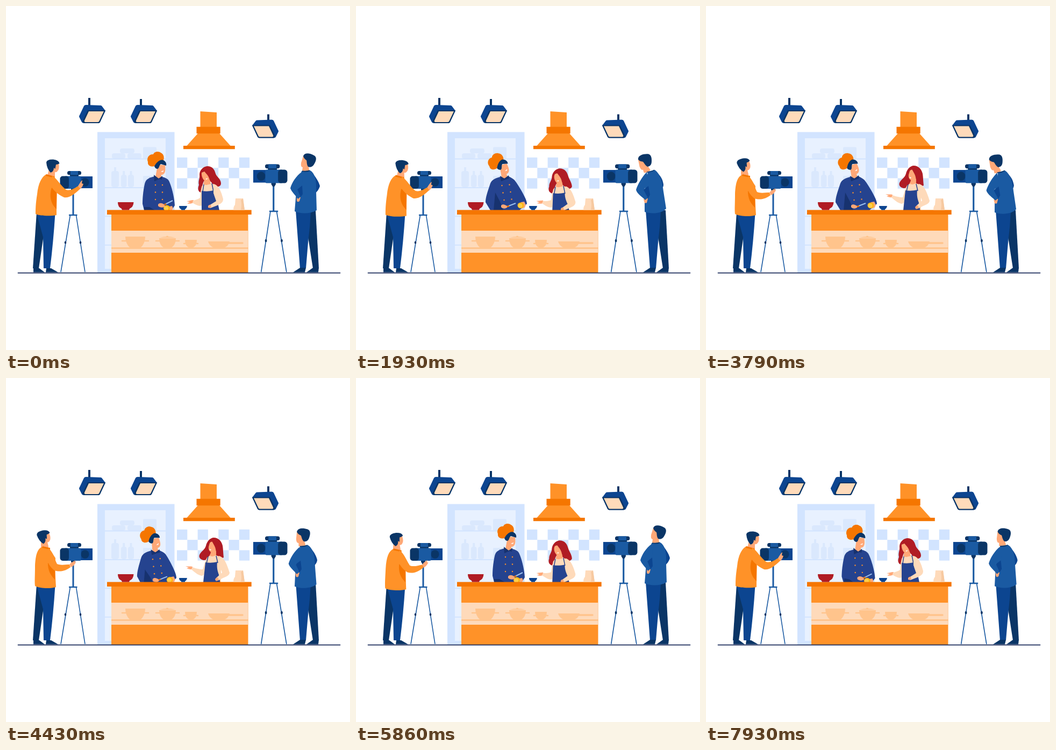
An HTML page with a canvas that plays this animation: 640x640 px, repeating every 8 s.

```html
<!DOCTYPE html>
<html>
<head>
<meta charset="utf-8">
<title>Cooking show</title>
<style>
html, body { margin: 0; height: 100%; overflow: hidden; background: #fff; }
canvas { display: block; width: 100vw; height: 100vh; }
</style>
</head>
<body>
<canvas id="stage" width="640" height="640"></canvas>
<script>
const ctx = document.getElementById('stage').getContext('2d');
const NAVY = '#0a3566', BLUE = '#0c4590', MID = '#1a5aa2', ROYAL = '#25438f', INK = '#17326f',
  ORANGE = '#ff9228', DEEP = '#f57600', CREAM = '#fedaba', SAND = '#ffc48c', SKIN = '#ffa877',
  RED = '#b01c24', ICE = '#d2e4ff', FROST = '#e8f1ff', MIST = '#dae8fd';

const fill = (d, color) => { ctx.fillStyle = color; ctx.fill(new Path2D(d)); };
const line = (d, color, width, cap = 'butt') => {
  ctx.strokeStyle = color; ctx.lineWidth = width; ctx.lineCap = cap; ctx.stroke(new Path2D(d));
};
const rect = (x1, y1, x2, y2, color, r = 0) => {
  ctx.fillStyle = color; ctx.beginPath(); ctx.roundRect(x1, y1, x2 - x1, y2 - y1, r); ctx.fill();
};
const oval = (x, y, rx, ry, color) => {
  ctx.fillStyle = color; ctx.beginPath(); ctx.ellipse(x, y, rx, ry, 0, 0, 7); ctx.fill();
};
const within = (draw, ...matrix) => { ctx.save(); ctx.transform(...matrix); draw(); ctx.restore(); };

const lerp = (a, b, k) => a + (b - a) * k;
// Blend two paths that share the same commands
const mix = (a, b, k) => {
  const ends = b.match(/[\d.]+/g);
  let i = 0;
  return a.replace(/[\d.]+/g, n => lerp(+n, +ends[i++], k));
};
const ease = p => {
  p = Math.min(1, Math.max(0, p));
  return p < .5 ? 2 * p * p : 1 - 2 * (1 - p) ** 2;
};
const sway = (t, go, back, span) => ease((t - go) / span) - ease((t - back) / span);

// Figure that dips while it goes from one pose to the other
function figure(k, dip, draw) {
  const morph = (a, b, color) => fill(mix(a, b, k), color);
  within(() => draw(morph), 1, 0, 0, 1, 0, dip * Math.sin(Math.PI * k));
}
function head(x, y, dx, dy, degrees, draw) {
  ctx.save();
  ctx.translate(x + dx, y + dy);
  ctx.rotate(degrees * Math.PI / 180);
  ctx.translate(-x, -y);
  draw();
  ctx.restore();
}

function lamp(poleTop) {
  rect(153, poleTop, 157, 186, NAVY);
  fill('M149 184L176 185Q178 185 179 187L185 195L175 216Q174 218 172 218L145 218Q142 218 141 216L136 206Q136 204 137 203L145 186Q146 184 149 184Z', BLUE);
  fill('M152 194L185 194L175 216Q174 218 172 218L145 218L142 215Z', NAVY);
  fill('M154 196L182 196L173 215Q172 216 170 216L147 216Q145 215 146 213Z', CREAM);
}

function backdrop() {
  rect(0, 0, 640, 640, '#fff');
  lamp(171);
  within(() => lamp(173), 1, 0, 0, 1, 96, 0);
  within(() => lamp(174), -1, 0, 0, 1, 643, 27.5);

  rect(170, 234.5, 313.5, 496, ICE);
  rect(184, 246, 297, 489, FROST);
  rect(197, 274, 222, 284, MIST, 4);
  rect(226, 274, 252, 284, MIST, 4);
  rect(212, 265, 239, 274, MIST, 4);
  rect(255, 262.5, 280, 284, MIST, 2);
  rect(255, 316, 280, 338, MIST, 2);
  for (const [x, w, y] of [[196, 14, 300], [214, 10.5, 307], [227, 11, 307]]) {
    rect(x, y + 7, x + w, 337, MIST, 4);
    rect(x + w / 2 - 2, y, x + w / 2 + 2, y + 10, MIST);
  }
  for (let y = 284.5; y < 450; y += 53.4) line(`M184 ${y}H297`, ICE, 2);

  const tile = 19.3;
  for (let i = 0; i < 21; i += 2) {
    const x = 318 + i % 7 * tile, y = 281.8 + Math.floor(i / 7) * tile;
    rect(x, y, x + tile, y + tile, ICE);
  }

  fill('M361.5 196L392 198V226H361.5Z', ORANGE);
  fill('M357 237H397L418.5 261H335.5Z', ORANGE);
  rect(354.5, 224.7, 398.7, 237.3, DEEP);
  rect(330, 260, 425.8, 266.3, DEEP);
}

function chef(k) {
  figure(k, 5.3, morph => {
    morph('M276 317C264 320 260 323 258 331C255 345 254 358 254 368L257 380L308 380L314 371C313 355 308 335 303 325C300 321 296 319 291 318Z',
      'M268 318C256 321 251 325 249 333C245 345 241 356 241 365L250 380L304 380L318 368C319 360 300 330 295 324C292 321 288 319 284 317Z', ROYAL);
    rect(250, 380, 310, 388, ROYAL);
    morph('M257 374L267 374L277 380L257 380Z', 'M259 347L268 364L274 380L256 380Z', INK);
    for (let i = 0; i < 6; i++) {
      const col = i % 2, row = i >> 1;
      oval(lerp(278 + 13 * col, 271.5 + 14 * col + 2 * row, k),
        lerp(333, 334 - 1.5 * col, k) + 13.5 * row, 1.2, 1.2, ORANGE);
    }
    head(284, 316, -8 * k, 0, -20 * k, () => {
      fill('M283 295L296 296C297 305 297 312 291 314L289 314L289 319L284 321L278 318L281 302Z', SKIN);
      fill('M276 298C270 300 263 297 264 290C261 283 266 275 274 276C276 270 285 270 288 273C293 275 295 281 293 287C288 287 280 291 276 298Z', DEEP);
      fill('M276 298C280 290 288 284 293 287C297 289 299 293 298 297L288 294C285 296 285 302 282 303C279 303 277 301 276 298Z', NAVY);
      fill('M288 308L293 306Q293 310 288 308Z', '#fff');
    });
    morph('M275 314L284 321L291 316L290 323L285 322L276 326Z', 'M268 316L276 321L284 315L285 321L278 323L270 326Z', INK);
    morph('M304 373L309 372L311 377L308 380L304 380Z', 'M307 365L313 364L316 370L314 375L308 377Z', SKIN);
    const x = lerp(299, 306.5, k), y = lerp(376, 371, k);
    oval(x, y, 6, 5.5, '#fcb813');
    oval(x - 1, y + .5, 4, 4, '#ffcd4a');
    line(mix('M297 368.5L310 362', 'M284 372L297 367', k), '#9dc0ee', 2);
    line(mix('M290 372L298 368', 'M277 374.5L285 372', k), DEEP, 2.5);
    morph('M283 369C286 366 289 366 294 369L296 373C291 376 286 375 283 372Z',
      'M270 371C273 368 276 369 281 372L281 375C277 378 272 377 270 374Z', SKIN);
  });
}

function cook(k) {
  figure(k, 5, morph => {
    morph('M374 298C385 298 388 305 390 312C392 318 400 322 400 330C400 336 394 337 389 336C384 334 384 329 380 326L368 326C364 334 366 340 362 347C356 344 357 338 359 333C357 325 361 321 360 314C360 306 366 299 374 298Z',
      'M386 297C396 297 401 304 403 312C404 318 404 326 405 334C401 336 396 335 393 333C390 332 390 330 388 328L380 328C377 334 374 339 368 339C362 338 358 334 360 329C362 323 370 320 372 312C374 304 379 298 386 297Z', RED);
    morph('M367 332L383 330L390 334L396 390L365 390L362 350L364 336Z', 'M378 331L391 330L400 333L400 390L366 390L369 352L372 338Z', CREAM);
    morph('M369 324L379 322L381 331L373 333L367 332Z', 'M382 321L391 321L391 330L384 332L379 331Z', SKIN);
    morph('M364 310C366 309 375 305 378 311C381 319 380 327 375 328C368 327 363 318 364 310Z',
      'M379 307C382 302 389 305 390 311C392 318 391 325 386 326C380 325 376 320 377 314Z', SKIN);
    morph('M367 302C369 312 376 311 379 324L386 322L382 304Z', 'M382 300C385 310 389 310 391 323L398 322L394 302Z', RED);
    morph('M371 322L375 320Q375 324 371 322Z', 'M378 318L382 319Q380 323 378 318Z', '#fff');
    morph('M349 361C344 361 340 363 336 363L342 365L337 367C342 369 345 367 349 366Z',
      'M347 351C343 350 339 351 334 350L340 353L336 354C341 356 343 356 346 356Z', SKIN);
    morph('M367 333C362 338 362 349 361 357C356 360 352 361 348 362L347 366C354 371 361 373 364 371C367 362 370 346 367 333Z',
      'M376 332C371 336 369 348 366 356C360 356 352 354 347 352L345 356C352 363 360 368 365 368C372 364 376 348 376 332Z', CREAM);
    morph('M364 344C372 345 378 345 386 343C386 352 390 358 394 366L399 390L364 390Z',
      'M371 343C378 344 385 344 393 342C392 352 393 358 396 366L400 390L366 390Z', ROYAL);
    line(mix('M368 332L366 345M383 330L386 345', 'M376 332L373 345M391 331L394 344', k), ROYAL, 1.5);
    morph('M386 331C396 333 401 347 404 359C404 366 399 368 393 371L380 376L378 371L391 363L386 348Z',
      'M396 331C407 333 412 350 416 362C416 368 408 370 404 372L394 377L391 372L402 362L397 348Z', CREAM);
    morph('M376 372Q378 369 381 370L382 374Q379 377 376 375Z', 'M389 374Q391 371 394 371L396 375Q392 379 390 377Z', SKIN);
  });
}

function pot(x, width, top, grip, gripY) {
  fill(`M${x} ${top}H${x + width}Q${x + width} ${top + 13} ${x + width - 9} 450H${x + 9}Q${x} ${top + 13} ${x} ${top}Z`, SAND);
  line(`M${x - grip} ${gripY}H${x + width + grip}`, SAND, 2.5, 'round');
}

function counter() {
  rect(196, 388, 450.5, 496, ORANGE);
  rect(196, 418, 450.5, 459, CREAM);
  rect(196, 449, 450.5, 452, SAND);
  pot(222, 37, 429, 6, 437);
  pot(285, 31, 432, 6, 437);
  fill('M286 431Q300 427 315 431Z', SAND);
  oval(300, 429, 2, 1.5, SAND);
  pot(333, 22, 435, 2, 442);
  fill('M376 438H416Q414 447 405 450H387Q378 446 376 438Z', SAND);
  line('M413 441H440', SAND, 3.5, 'round');
  rect(188, 379.5, 456.7, 388, DEEP);
  fill('M208 365H237.5Q237 374 230 377L229 379.5H216L215 377Q208 374 208 365Z', RED);
  fill('M322 372H337Q336 377 333 378V379.5H326V378Q322 377 322 372Z', BLUE);
  fill('M427 358H441L444 379.5H423Q423 373 426 370Z', CREAM);
  fill('M437 361L441 358L444 379.5H437Q439 370 437 361Z', '#f7c9a0');
}

function camera() {
  line('M119.5 389L102 495M130.5 389L147 495', MID, 1.6);
  line('M117 389H132.5', MID, 2.4);
  line('M125 344V389', MID, 3);
  oval(110.5, 440, 1.8, 2.6, NAVY);
  oval(138.5, 440, 1.8, 2.6, NAVY);
  fill('M121 339H129V342L126.5 346H123.5L121 342Z', NAVY);
  rect(138, 317, 161, 339, BLUE);
  oval(147, 328, 7.5, 8, NAVY);
  rect(119, 312, 135, 318, NAVY);
  rect(114, 307, 140, 314.3, NAVY, 3.5);
  rect(120, 307, 134, 314.3, MID);
  rect(109, 316.5, 139.5, 340, MID, 2);
  rect(100.5, 316.5, 117, 340, NAVY, 5);
}

function legs() {
  fill('M57 384L50 488H61L76 386Z', NAVY);
  fill('M57 386L69 430L70 488H82Q88 440 91.5 386Z', BLUE);
  fill('M51 486L62 488L72 495.5H51Z', NAVY);
  fill('M75 488H84L97 495.5H74Z', NAVY);
  fill('M560 380H576L582 488H571L562 430Z', NAVY);
  fill('M539 380L547 488H558L562 440Q566 410 567 380Z', BLUE);
  fill('M547 487H558L556 495.5H534Z', NAVY);
  fill('M571 487H582L581 495.5H559Z', NAVY);
  line('M22.5 496.6H621.5', '#1c2c5b', 1.8, 'round');
}

function operator(k) {
  figure(k, 5, morph => {
    head(84, 316, -12 * k, -2 * k, -14 * k, () => {
      fill('M88 293L98 293Q100 303 96 307Q94 310 91 309V318L84 321L77 315L80 304Z', SKIN);
      fill('M75 291Q76 285 88 285.5Q99 287 99.5 293Q96 295 93 295L91.5 303L89 301Q89 308 83 310Q76 303 75 291Z', NAVY);
    });
    morph('M75 313C66 318 60 330 58 350C55 368 55 380 55 387C64 391 84 391 94 389C94 370 95 350 95 335L90 318Z',
      'M68 314C58 317 55 330 54 350C54 368 53 378 54 387C64 392 84 392 93 389C92 370 91 350 92 335L81 318Z', ORANGE);
    morph('M75 313L90 317L91 320L74 316Z', 'M68 313L82 316L82 319L67 316Z', DEEP);
    morph('M85 338C81 350 81 366 94 378L94 345Z', 'M78 344C78 358 82 366 91 375L91 352Z', DEEP);
    morph('M134 335C137 330 139 326 142 324L141 330L144 331Q142 338 137 341Z',
      'M118 347C121 343 125 342 129 339L128 342L130 343Q126 350 121 352Z', SKIN);
    morph('M86 316C96 322 102 335 112 342C120 344 126 340 134 335L138 340C128 350 117 358 108 356C96 350 86 342 83 332Z',
      'M79 317C88 324 90 336 95 346C102 349 110 347 118 347L120 352C112 358 102 362 90 358C82 352 76 342 74 330Z', ORANGE);
  });
}

function director(k) {
  figure(k, 5.5, morph => {
    morph('M570 311C578 320 583 330 584 335C582 342 578 346 574 350Z', 'M561 311C569 318 571 326 572 332C572 338 570 338 567 338Z', BLUE);
    head(558, 306, -16 * k, k, -28 * k, () => {
      fill('M553 279L562 284L564 307L558 309L551 306L552 300Q548 300 549 292Z', SKIN);
      fill('M553 279C556 272 566 274 573 278C579 281 577 288 574 293C571 299 567 301 562 299C559 294 560 290 559 287C556 285 554 283 553 279Z', NAVY);
    });
    morph('M550 307L566 306C575 311 578 325 577 345L578 380C566 387 548 387 537 382L540 345Z',
      'M543 308L556 305C566 312 570 328 572 345L577 377C568 387 548 387 537 383L537 345Z', MID);
    line(mix('M551 307Q558 309 565 306', 'M541 309Q549 309 555 305', k), NAVY, 1.5);
    morph('M551 334L552 350L547 357L541 342Z', 'M544 335L547 351L543 359L534 342Z', BLUE);
    morph('M541 357Q544 354 548 356L546 363Q542 366 541 362Z', 'M535 359Q538 356 543 358L541 366Q537 368 536 364Z', SKIN);
    morph('M550 309C540 316 532 328 529 339C531 346 540 353 543 359L548 355L542 341L552 328Z',
      'M541 309C532 318 524 332 521 342C523 350 534 356 538 361L543 357L535 342L545 330Z', MID);
  });
}

function render() {
  const t = performance.now() % 8000 % 7140;
  backdrop();
  chef(sway(t, 430, 3930, 1500));
  cook(sway(t, 1285, 5000, 1500));
  counter();
  legs();
  camera();
  within(camera, -1.05, 0, 0, 1.068, 629, -33.5);
  operator(sway(t, 1560, 5190, 1700));
  director(sway(t, 40, 3470, 1760));
  requestAnimationFrame(render);
}
render();
</script>
</body>
</html>
```
